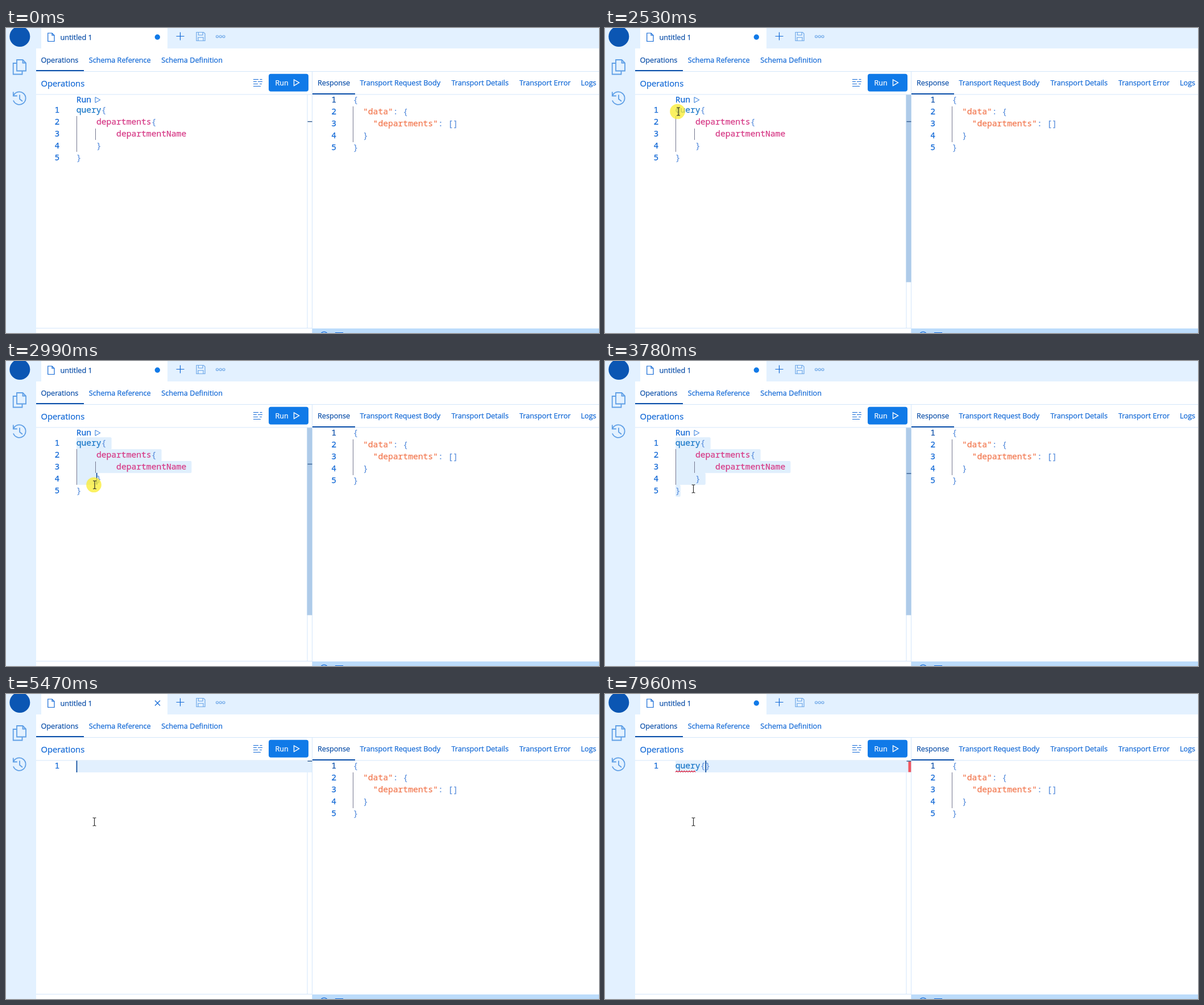
An HTML page for the animation above (8000 ms loop, 1043 by 537 pixels).

```html
<!DOCTYPE html>
<html lang="en">
<head>
<meta charset="utf-8">
<title>Query editor</title>
<style>
  html, body { margin: 0; width: 100%; height: 100%; overflow: hidden; background: #fff; }
  svg { display: block; width: 100vw; height: 100vh; }
  text { font: 12.65px "Open Sans", "Noto Sans", sans-serif; color: #1168d6; white-space: pre; }
  text, tspan { fill: currentColor; stroke: currentColor; stroke-width: .25px; }
  .heading { font-size: 14.75px; }
  text.active { color: #0a4ea8; }
  .code text, text.code { font: 14.67px "Noto Sans Mono", "DejaVu Sans Mono", monospace; }
  .num { text-anchor: middle; }
  .key { color: #1a78c8; }
  .field { color: #d63a86; }
  .brace { color: #6093de; }
  .str { color: #f27a52; }
  .match { color: #7d3cc4; font-weight: 700; }
  .line { fill: none; stroke: #1168d6; stroke-width: 1.2; }
  .pale { stroke: #6ea8e8; }
  .thick { stroke: #5f9fe6; stroke-width: 1.8; }
  .thin { stroke-width: .9; }
  .guide { stroke: #74778f; }
  .rule { stroke: #d3e6fa; }
</style>
</head>
<body>
<svg viewBox="0 0 1043 537" preserveAspectRatio="none">
  <!-- window frame -->
  <rect width="1043" height="537" fill="#e3f1ff"/>
  <rect x="53" y="36" width="990" height="501" fill="#fff"/>
  <rect x="62" width="222" height="37" fill="#fff"/>
  <circle cx="24.3" cy="15" r="18" fill="#0b56b3"/>
  <path class="line thick" d="M19 56h10.500l5.500 5.500v14h-16zM29.500 56v5.500h5.500M19 62h-6.300v19.500h15.800v-6"/>
  <path class="line thick" d="M12.800 112.500v7h7M13.200 119a11.200 11.200 0 1 1-.3 8.500M24 117.500v7.500l5 4"/>

  <!-- tab strip -->
  <path class="line" d="M73.700 9h7.300l4 4v10.500h-11.300zM81 9v4h4"/>
  <text x="95.500" y="20.700" class="active">untitled 1</text>
  <circle id="dot" cx="266.300" cy="16" r="4.700" fill="#107ae8"/>
  <path id="cross" class="line" d="M262 11.500l9 9M271 11.500l-9 9"/>
  <path class="line" d="M299.500 14.500h14M306.500 7.500v14"/>
  <path class="line pale" d="M335 7.500h12.500l2.500 2.500v12.500h-15zM338.500 7.500v5h7.500v-5M338 22.500v-6h9v6"/>
  <g class="line pale"><circle cx="371.500" cy="15" r="2"/><circle cx="377.300" cy="15" r="2"/><circle cx="383" cy="15" r="2"/></g>

  <!-- section tabs -->
  <g id="labels"></g>
  <path class="rule" d="M53 76.500H1043M53 117H1043M538.500 77V537M530 117V528M53 528.500H538" fill="none"/>
  <path d="M53 74h84v2h-84zM539 115h75v2h-75z" fill="#0a4ea8"/>
  <path class="line" d="M435 90.500h9M446.500 90.500h4M435 94.500h6M443 94.500h8M435 98.500h8M446 98.500h4M435 102.500h13"/>
  <rect x="462" y="80.700" width="70" height="31" rx="4" fill="#107ae8"/>
  <text x="473.500" y="101" style="color:#fff">Run</text>
  <path d="M506.500 91v10.500l9-5.250z" fill="none" stroke="#fff" stroke-width="1.4"/>
  <rect x="539" y="529" width="504" height="8" fill="#bcdcfb"/>
  <path class="line" d="M554 537.500a7 7 0 0 1 11 0M579.500 538v-1.500h13v1.500"/>

  <!-- response -->
  <g id="response" class="code"></g>
  <path class="guide" d="M610.500 138V201"/>

  <!-- first query -->
  <g id="before">
    <g id="selection" fill="#e0effd"></g>
    <g id="query" class="code"></g>
    <text x="123.700" y="131.300" class="code">Run</text>
    <path class="line thin" d="M157 121.800v9.600l8.800-4.800z"/>
    <path class="guide" d="M124.500 155V218M157.500 177V197"/>
  </g>

  <!-- retyped query -->
  <g id="after">
    <rect x="124" y="117.500" width="414" height="20.500" fill="#e2f0fe"/>
    <text x="90" y="131.300" class="code num">1</text>
    <text x="123.700" y="131.300" class="code"><tspan id="word"></tspan><tspan id="braces" class="brace"></tspan></text>
    <path id="squiggle" fill="none" stroke="#e0304a" stroke-width="1.100"/>
  </g>

  <rect id="scrollbar" x="529.500" y="117.500" width="9" fill="#aecbe9"/>
  <rect id="errorMark" x="533.500" y="118" width="4.800" height="19.500" fill="#f2555f"/>
  <rect id="tick" x="530.500" width="8" height="1.500" fill="#3d6496"/>
  <rect id="caret" width="1.700" height="20.700" fill="#0a4a9c"/>

  <g id="popup">
    <rect x="0" y="140" width="486" height="34" rx="5" fill="#5b7fa8" opacity=".08"/>
    <rect x=".5" y="139" width="484.500" height="32.500" rx="4" fill="#fff" stroke="#d3e1ef"/>
    <rect x="5" y="143.300" width="474" height="20.500" rx="3" fill="#bddcfc"/>
    <path class="line" d="M16 146.300l6.500 3.500v7l-6.500 3.500l-6.500-3.500v-7zM9.500 149.800l6.500 3.500l6.500-3.500M16 153.300v7"/>
    <text x="30" y="158" class="code"><tspan id="typedPart" class="match"></tspan><tspan id="restPart"></tspan></text>
  </g>

  <circle id="halo" r="13.300" fill="#faec30" opacity=".76"/>
  <path id="pointer" d="M-3-7h2l1 1l1-1h2M0-6V6M-3 7h2l1-1l1 1h2" fill="none" stroke="#222" stroke-width="1.100"/>
</svg>

<script>
const LOOP = 8000, CHAR = 8.8, ROW = 20.9, LEFT = 124;
const $ = id => document.getElementById(id);
const show = (id, on) => { $(id).style.display = on ? '' : 'none'; };
const within = (t, from, to) => t >= from && t < to;
const place = (id, x, y) => $(id).setAttribute('transform', `translate(${x} ${y})`);

const labels = [
  ['Operations', 61.5, 60.8, 'active'], ['Schema Reference', 145.7, 60.8], ['Schema Definition', 273.3, 60.8],
  ['Operations', 61.5, 102.7, 'heading'],
  ['Response', 548, 101, 'active'], ['Transport Request Body', 622.5, 101],
  ['Transport Details', 783.5, 101], ['Transport Error', 903, 101], ['Logs', 1011, 101]
];
$('labels').innerHTML = labels.map(([s, x, y, c = '']) => `<text x="${x}" y="${y}" class="${c}">${s}</text>`).join('');

// Each line: indent in characters, then [class, text] tokens.
const query = [
  [0, ['key', 'query'], ['brace', '{']],
  [4, ['field', 'departments'], ['brace', '{']],
  [8, ['field', 'departmentName']],
  [4, ['brace', '}']],
  [0, ['brace', '}']]
];
const response = [
  [0, ['brace', '{']],
  [2, ['str', '"data"'], ['brace', ': {']],
  [4, ['str', '"departments"'], ['brace', ': []']],
  [2, ['brace', '}']],
  [0, ['brace', '}']]
];
function drawCode(id, lines, numberX, x, y, activeRow) {
  $(id).innerHTML = lines.map(([indent, ...tokens], i) => {
    const base = y + i * ROW;
    const spans = tokens.map(([c, s]) => `<tspan class="${c}">${s}</tspan>`).join('');
    return `<text class="num ${i === activeRow ? 'active' : ''}" x="${numberX}" y="${base}">${i + 1}</text>` +
      `<text x="${x + indent * CHAR}" y="${base}">${spans}</text>`;
  }).join('');
}
drawCode('query', query, 90, 123.7, 149.2);
drawCode('response', response, 576.7, 610.4, 131.4, 0);
const lengths = query.map(([indent, ...tokens]) => tokens.reduce((n, [, s]) => n + s.length, indent));

// Pointer path: time, x, y, number of steps taken to get there.
const path = [
  [800, 870, 529], [870, 560, 430, 1], [930, 363, 352, 1], [990, 330, 314, 1], [1123, 330, 314, 1],
  [1660, 150, 140, 8], [1930, 112, 160, 4], [2000, 129, 147, 1], [2530, 129, 147, 1],
  [2990, 156, 218, 7], [3110, 156, 218, 1], [3250, 155.5, 225, 2]
];
function pointerAt(t) {
  const i = path.findIndex(k => k[0] > t);
  if (i < 1) return (i ? path[path.length - 1] : path[0]).slice(1, 3);
  const [t0, x0, y0] = path[i - 1], [t1, x1, y1, steps] = path[i];
  const f = Math.floor((t - t0) / (t1 - t0) * steps) / steps;
  return [x0 + (x1 - x0) * f, y0 + (y1 - y0) * f];
}

const typing = [[0, ''], [5800, 'q'], [6580, 'qu'], [6710, 'que'], [6840, 'quer'], [7040, 'query'], [7960, 'query{}']];
const squiggles = [[0, 0], [6090, 1], [7110, 3], [7300, 4]];
const caretGaps = [[3660, 4130], [5000, 5470], [6290, 6580], [7560, 7960]];
const latest = (list, t) => list.filter(k => k[0] <= t).pop()[1];

function selectTo(row, col) {
  $('selection').innerHTML = lengths.slice(0, row + 1).map((n, i) => {
    const width = (i < row ? n + 1 : col) * CHAR;
    return `<rect x="${LEFT}" y="${134.3 + i * ROW}" width="${width}" height="${ROW + .2}" rx="2"/>`;
  }).join('');
}

function zigzag(chars) {
  let d = `M${LEFT} 137.5`;
  for (let i = 1; i <= chars * 4; i++) d += `L${LEFT + i * CHAR / 4} ${i % 2 ? 135.3 : 137.5}`;
  return chars ? d : '';
}

function render(t) {
  const cleared = t >= 4460, dragging = within(t, 2590, 4460);
  const [x, y] = pointerAt(t);
  const text = latest(typing, t);
  let row = 0, col = Math.min(text.length, 6);

  if (dragging) {
    row = Math.max(0, Math.min(4, Math.floor((y - 134.5) / ROW)));
    col = Math.min(lengths[row], Math.round((x - LEFT) / CHAR));
  }
  selectTo(row, dragging ? col : 0);
  show('before', !cleared);
  show('after', cleared);

  $('word').textContent = text.slice(0, 5);
  $('word').setAttribute('class', t < 7110 ? 'field' : 'key');
  $('braces').textContent = text.slice(5);
  $('squiggle').setAttribute('d', zigzag(latest(squiggles, t)));

  show('caret', (dragging || cleared) && !caretGaps.some(g => within(t, ...g)));
  place('caret', LEFT - .4 + col * CHAR, cleared ? 117.3 : 134.3 + row * ROW);
  place('tick', 0, cleared ? 117.5 : dragging ? 131 + 16.6 * row : 164);
  show('errorMark', t >= 6090);

  $('scrollbar').setAttribute('height', cleared ? 411 : 330);
  $('scrollbar').style.opacity = within(t, 930, 4530) ? 1 : within(t, 870, 4600) ? .5 : 0;

  const saved = within(t, 4800, 6000);
  show('dot', !saved);
  show('cross', saved);

  show('popup', within(t, 5800, 7040));
  place('popup', LEFT - 2 + col * CHAR, 0);
  $('typedPart').textContent = text.slice(0, 5);
  $('restPart').textContent = 'query'.slice(text.length);

  show('pointer', t >= 800);
  place('pointer', x, y);
  show('halo', within(t, 2530, 3780));
  place('halo', x - 1.5, y);
}

const start = performance.now();
function tick() {
  render((performance.now() - start) % LOOP);
  requestAnimationFrame(tick);
}
tick();
</script>
</body>
</html>
```
